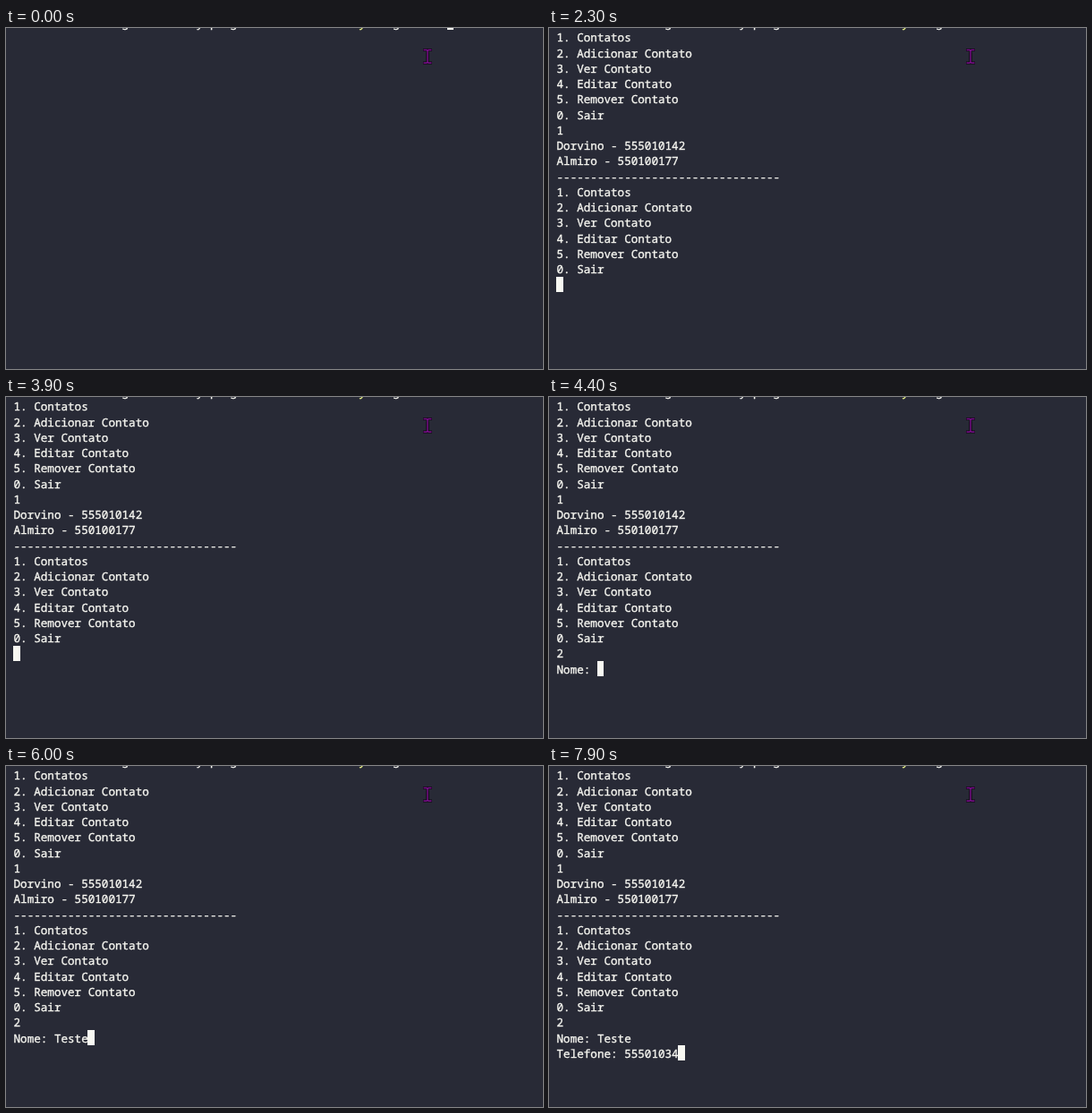
An HTML page for the animation above (8000 ms loop, 600 px wide and 381 px high).

```html
<!DOCTYPE html>
<html lang="pt">
<head>
<meta charset="utf-8">
<title>Agenda de contatos</title>
<style>
  html, body { margin: 0; width: 100%; height: 100%; overflow: hidden; background: #282a36; }
  #term {
    position: absolute; left: 8.5px; top: -14.95px; margin: 0;
    font: 12.625px/17.25px "Noto Sans Mono", monospace;
    text-rendering: geometricPrecision; font-variant-ligatures: none;
    color: #f8f8f2; -webkit-text-stroke: .35px;
  }
  #term b { font-weight: inherit; position: relative; top: .8px; }
  #term i { font-style: normal; color: #f1fa8c; }
  #caret { position: absolute; width: 7.6px; height: 17.25px; background: #f8f8f2; }
  svg { position: absolute; left: 465px; top: 22px; }
</style>
</head>
<body>
<pre id="term"></pre>
<div id="caret"></div>
<svg width="13" height="20" fill="none">
  <path id="beam" d="M1 2.5H5L6 3.5L7 2.5H11M6 3.5V15.5M1 17H5L6 16L7 17H11" stroke-width="3.2" stroke="#0c0610"/>
  <path d="M1.5 2.5H5L6 3.5L7 2.5H10.5M6 3.5V15.5M1.5 17H5L6 16L7 17H10.5" stroke-width="1.4" stroke="#7d108f"/>
</svg>
<script>
const LOOP = 8000, CELL = 7.575, ROW = 17.25, LEFT = 8.1, TOP = -15.65;
const term = document.getElementById('term');
const caret = document.getElementById('caret');

// Only the descenders of the scrolled-off command line reach the stage.
const COLUMNS = 64, YELLOW = 51;
const command = Array(COLUMNS).fill(' ');
for (const [col, ch] of Object.entries({16: 'g', 27: 'y', 29: 'p', 32: 'g', [YELLOW]: 'y', 56: 'g'}))
  command[col] = ch;
const commandHtml = '<b>' + command.map((ch, i) => i === YELLOW ? `<i>${ch}</i>` : ch).join('') + '</b>';

const menu = ['1. Contatos', '2. Adicionar Contato', '3. Ver Contato',
  '4. Editar Contato', '5. Remover Contato', '0. Sair', ''].join('\n');
const contacts = 'Dorvino - 555010142\nAlmiro - 550100177\n';

const typed = (text, start, step) => [...text].map((ch, i) => [start + i * step, ch]);

// Each entry appends text to the terminal at its time.
const output = [
  [0, command.join('')],
  [400, '\n'],
  [600, menu],
  [1900, '1'],
  [2100, '\n' + contacts + '-'.repeat(33) + '\n' + menu],
  [4100, '2'],
  [4400, '\nNome: '],
  [5000, 'T'],
  ...typed('este', 5400, 200),
  [6500, '\nTelefone: '],
  ...typed('55501034', 7000, 115),
];

let shown = '';
function draw(now) {
  const t = now % LOOP;
  const text = output.filter(([at]) => at <= t).map(([, s]) => s).join('');
  if (text !== shown) {
    shown = text;
    term.innerHTML = commandHtml + text.slice(COLUMNS);
    const lines = text.split('\n');
    caret.style.left = LEFT + lines.at(-1).length * CELL + 'px';
    caret.style.top = TOP + (lines.length - 1) * ROW + 'px';
  }
  requestAnimationFrame(draw);
}
draw(performance.now());
</script>
</body>
</html>
```
